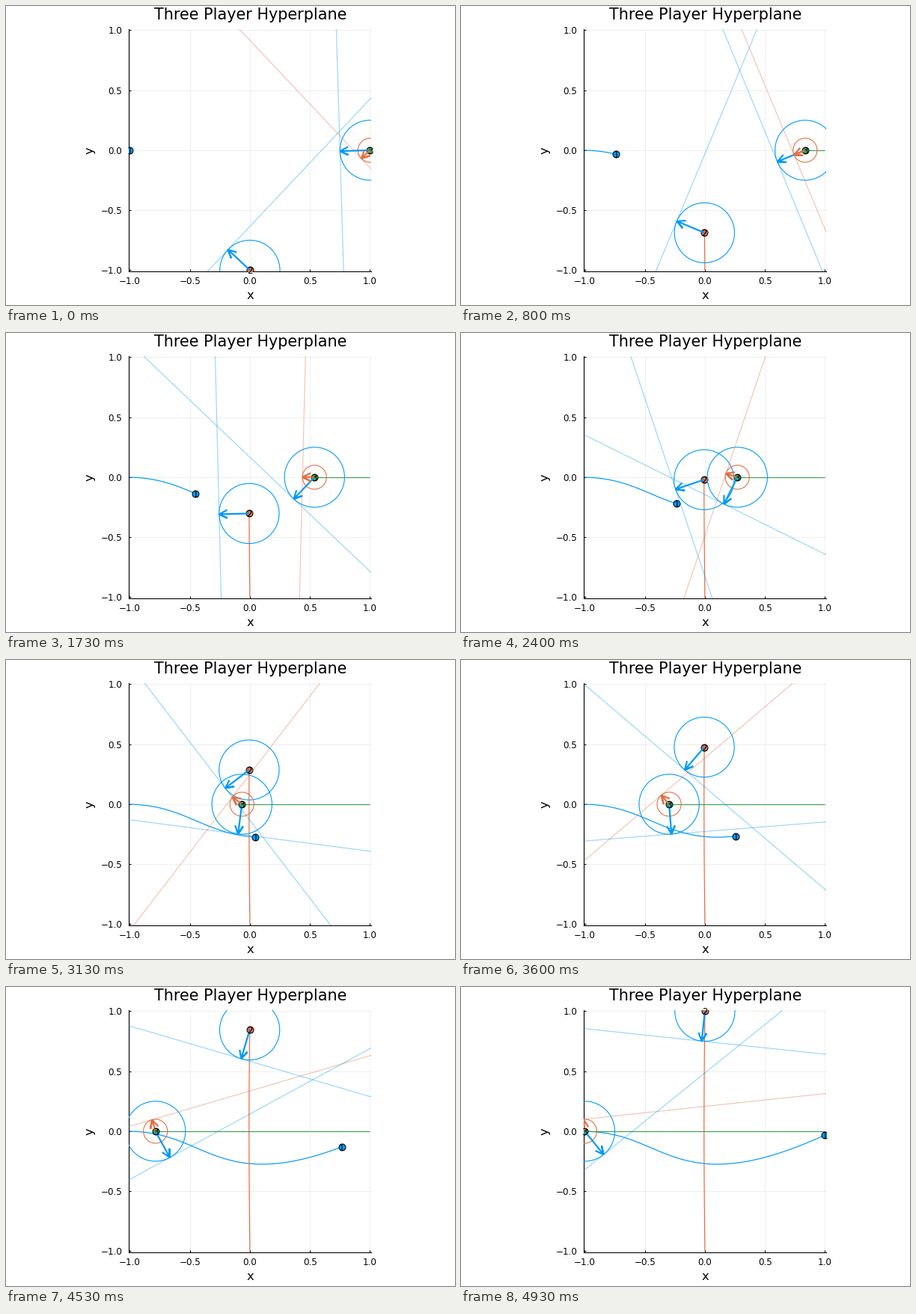
A matplotlib script that plays this animation: 600x400 px, repeating every 4990 ms.

```python
import numpy as np
import matplotlib.pyplot as plt
from matplotlib.animation import FuncAnimation

W, H, DPI = 600, 400, 100
PX = 72 / DPI
FRAMES, LOOP = 75, 4990
BLUE, ORANGE, GREEN = "#009AF9", "#E26F46", "#3DA44D"
STEP = 0.03  # radians per frame

plt.rcParams["font.family"] = "DejaVu Sans"
plt.rcParams["lines.solid_capstyle"] = "butt"


def smooth(keys, vals, deg=5):
    """Polynomial through the way points, pinned at both ends."""
    u = np.array(keys) / (FRAMES - 1)
    w = np.ones(len(u))
    w[[0, -1]] = 6
    return np.polyval(np.polyfit(u, vals, deg, w=w), np.linspace(0, 1, FRAMES))


keys = [0, 12, 26, 36, 47, 62, 74]
u = np.linspace(0, 1, FRAMES)
p1 = np.column_stack([
    smooth(keys, [-1, -.738, -.453, -.234, .043, .538, 1]),
    smooth([0, 6, 12, 26, 36, 47, 50, 62, 74],
           [0, -.008, -.035, -.138, -.218, -.274, -.276, -.206, -.032]),
])
p2 = np.column_stack([
    -.007 * np.sin(np.pi * u),
    smooth(keys, [-1, -.688, -.302, -.021, .286, .688, 1]),
])
p3 = np.column_stack([
    smooth(keys, [1, .834, .538, .27, -.066, -.574, -1]),
    np.zeros(FRAMES),
])

fig = plt.figure(figsize=(W / DPI, H / DPI), dpi=DPI, facecolor="white")
left, right, top, bottom = 163.6, 488.2, 30.7, 355.2
ax = fig.add_axes([left / W, 1 - bottom / H, (right - left) / W, (bottom - top) / H])
LIM = 1.011
UNIT = (right - left) / (2 * LIM)  # pixels per data unit
ax.set(xlim=(-LIM, LIM), ylim=(-LIM, LIM))
ax.set_axisbelow(True)
ax.grid(color="black", alpha=.1, lw=.6 * PX)
ax.spines[["top", "right"]].set_visible(False)
for side in ("left", "bottom"):
    ax.spines[side].set_linewidth(1.1 * PX)

ticks = [-1, -.5, 0, .5, 1]
names = [f"{t:.1f}".replace("-", "\u2212") for t in ticks]
ax.set_xticks(ticks, names)
ax.set_yticks(ticks, names)
ax.tick_params(direction="in", length=3 * PX, width=PX, labelsize=8.57)
ax.tick_params(axis="x", pad=7 * PX)
ax.tick_params(axis="y", pad=8.3 * PX)


def label(x, y, s, size, **kw):
    fig.text(x / W, 1 - y / H, s, fontsize=size, ha="center", **kw)


label(326.8, 18.3, "Three Player Hyperplane", 14.94, va="baseline")
label(326, 392, "x", 11.8, va="baseline")
label(112, 193, "y", 11.8, va="center", rotation=90)


class Player:
    def __init__(self, path, color, name):
        self.path = path
        self.trail, = ax.plot([], [], color=color, lw=1.2 * PX, zorder=3)
        self.dot, = ax.plot([], [], "o", ms=9 * PX, mfc=color, mec="black",
                            mew=PX, zorder=4)
        self.text = ax.text(0, 0, name, fontsize=8.57, ha="center",
                            va="center_baseline", zorder=7)

    def draw(self, k):
        x, y = self.path[k]
        self.trail.set_data(*self.path[:k + 1].T)
        self.dot.set_data([x], [y])
        self.text.set_position((x, y))
        return [self.trail, self.dot, self.text]


class Hyperplane:
    """Zone around a player with a turning normal and its tangent line."""

    def __init__(self, path, radius, start, spin, color):
        self.path, self.radius = path, radius
        self.start, self.spin = np.radians(start), spin
        self.line, = ax.plot([], [], color=color, alpha=.4, lw=1.2 * PX, zorder=5)
        self.zone, = ax.plot([], [], color=color, lw=1.1 * PX, zorder=5)
        self.arrow, = ax.plot([], [], color=color, lw=2.2 * PX, zorder=6,
                              solid_joinstyle="miter")

    def draw(self, k):
        c = self.path[k]
        a = self.start + self.spin * STEP * (k + 1)
        n = np.array([np.cos(a), np.sin(a)])
        t = np.array([-n[1], n[0]])
        tip = c + self.radius * n
        back, side = tip - n * 11 / UNIT, t * 5.4 / UNIT
        self.line.set_data(*np.array([tip - 4 * t, tip + 4 * t]).T)
        th = np.linspace(0, 2 * np.pi, 121)
        self.zone.set_data(c[0] + self.radius * np.cos(th),
                           c[1] + self.radius * np.sin(th))
        self.arrow.set_data(*np.array([c, tip, back + side, tip, back - side]).T)
        return [self.line, self.zone, self.arrow]


parts = [
    Player(p1, BLUE, "1"),
    Player(p2, ORANGE, "2"),
    Player(p3, GREEN, "3"),
    Hyperplane(p2, .25, 135, 1, BLUE),
    Hyperplane(p3, .25, 180, 1, BLUE),
    Hyperplane(p3, .1, 225, -1, ORANGE),
]


def update(k):
    return [artist for part in parts for artist in part.draw(k)]


anim = FuncAnimation(fig, update, frames=FRAMES, interval=LOOP / FRAMES,
                     repeat=True, repeat_delay=0, blit=False)
plt.show()
```
